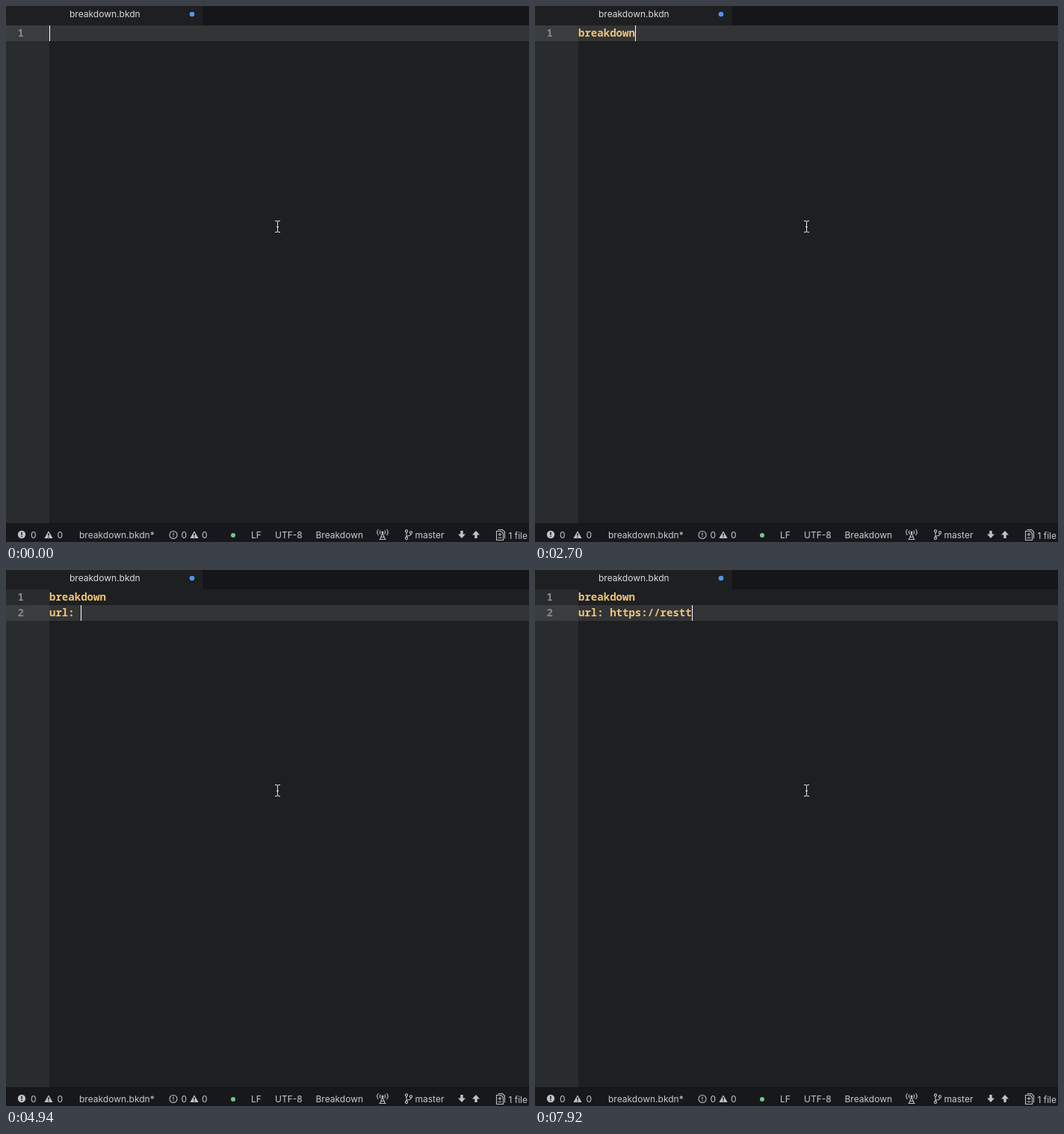
An HTML page for the animation above (8000 ms loop, 700 by 717 pixels).

```html
<!DOCTYPE html>
<html lang="en">
<head>
<meta charset="utf-8">
<style>
  html, body { margin: 0; width: 100%; height: 100%; overflow: hidden; background: #1d1f21; }
  svg { display: block; }
  text { white-space: pre; }
  .ui { font: 12px Inter, Roboto, sans-serif; fill: #c8cbcd; }
  .code { font: 600 14.05px "Noto Sans Mono", "DejaVu Sans Mono", monospace; }
  .num { fill: #85898b; }
  .icon { fill: none; stroke: #c0c3c5; stroke-width: 1.1; }
  .solid { fill: #c0c3c5; }
  .cut { fill: none; stroke: #17181b; stroke-width: 1.5; }
</style>
</head>
<body>
<svg width="700" height="717" viewBox="0 0 700 717">
  <defs>
    <g id="warn">
      <path class="solid" d="M0-5.3 5.6 4.6H-5.6Z"/>
      <path class="cut" d="M0-2.2V1.3M0 2.2V3.6"/>
    </g>
    <path id="arrow" class="solid" d="M-1.7-5H1.7V-.5H5L0 5-5-.5H-1.7Z"/>
  </defs>

  <rect width="700" height="26" fill="#151619"/>
  <rect width="264" height="26" fill="#1d1f21"/>
  <rect x="264" width="1" height="26" fill="#101113"/>
  <text class="ui" x="85" y="15" style="fill:#d9dcdd">breakdown.bkdn</text>
  <circle cx="249" cy="11" r="3.3" fill="#4f96f0"/>

  <rect y="26" width="58" height="666" fill="#282c2e"/>
  <g id="active">
    <rect y="26" width="58" height="21" fill="#393d3f"/>
    <rect x="58" y="26" width="642" height="21" fill="#333436"/>
  </g>
  <g class="code">
    <text class="num" x="15.5" y="41">1</text>
    <text class="num" x="15.5" y="62" id="second">2</text>
    <text class="line" x="58" y="41"></text>
    <text class="line" x="58" y="62"></text>
  </g>
  <rect id="caret" width="1" height="21" fill="#fff"/>

  <path d="M360 287.5H362Q363.5 287.5 363.5 289V301Q363.5 302.5 362 302.5H360M367 287.5H365Q363.5 287.5 363.5 289M363.5 301Q363.5 302.5 365 302.5H367M362 295.5H365" fill="none" stroke="#e4e4e4"/>

  <rect y="692" width="700" height="25" fill="#17181b"/>
  <rect y="692" width="700" height="1" fill="#101113"/>
  <g class="ui">
    <text x="33" y="712">0</text>
    <text x="68.500" y="712">0</text>
    <text x="98" y="712">breakdown.bkdn*</text>
    <text x="234.500" y="712">0</text>
    <text x="262" y="712">0</text>
    <text x="328" y="712">LF</text>
    <text x="360" y="712">UTF-8</text>
    <text x="414.500" y="712">Breakdown</text>
    <text x="547.500" y="712">master</text>
    <text x="672.500" y="713">1 file</text>
  </g>
  <circle class="solid" cx="21" cy="707" r="5.2"/>
  <path class="cut" d="M21 703.800V707.800M21 708.800V710.300"/>
  <use href="#warn" x="57" y="707.500"/>
  <circle class="icon" cx="224" cy="707.500" r="5"/>
  <path class="icon" d="M224 704.500V708.300M224 709.300V710.600"/>
  <use href="#warn" x="252" y="707.500"/>
  <circle cx="304" cy="708" r="3" fill="#70c888"/>

  <g class="icon">
    <path d="M504 705 500.500 714M504 705 507.500 714M502 710.500H506M499.500 713.500H508.500"/>
    <circle class="solid" cx="504" cy="704" r="1"/>
    <path d="M501.300 701.500Q499.500 704 501.300 706.500M506.700 701.500Q508.500 704 506.700 706.500M498.500 700Q495 704 498.500 708M509.500 700Q513 704 509.500 708"/>
    <circle cx="536" cy="702.500" r="1.600"/>
    <circle cx="536" cy="712" r="1.600"/>
    <circle cx="542" cy="704.500" r="1.600"/>
    <path d="M536 704V710.500M542 706Q542 708.500 538.500 708.800 536 709 536 710.500"/>
    <path d="M658.500 700.500H664.500L667.500 703.500V712.500M656.500 702.500H662.500L665.500 705.500V714.500H656.500ZM661 704.500V709.500M658.500 707H663.500M658.500 711.500H663.500"/>
  </g>
  <use href="#arrow" x="610" y="707"/>
  <use href="#arrow" transform="translate(629 707) scale(1 -1)"/>
</svg>
<script>
const LOOP = 8000, ADVANCE = 8.43, LINE = 21;
const typed = 'breakdown\nurl: https://restt';
// One key time per typed character
const keys = [
  150, 600, 750, 1050, 1350, 1650, 1800, 1950, 2100, 2850,
  3740, 3890, 4040, 4340, 4940, 5090, 5240, 5390, 5540, 5690,
  6130, 6430, 6580, 7330, 7480, 7630, 7770, 7920
];
const caretOff = [[450, 600], [2400, 2700], [3150, 3450], [4640, 4940], [5990, 6130], [6880, 7330]];
const keywords = [/^breakdown/, /^url:/];

const byId = id => document.getElementById(id);
const lineEls = document.querySelectorAll('.line');
const show = (el, on) => el.setAttribute('visibility', on ? 'visible' : 'hidden');

function draw(t) {
  const count = keys.filter(k => k <= t).length;
  const lines = typed.slice(0, count).split('\n');
  const row = lines.length - 1;
  lineEls.forEach((el, i) => {
    const text = lines[i] || '';
    el.textContent = text;
    el.setAttribute('fill', keywords[i].test(text) ? '#edc47a' : '#7a7d7f');
  });
  show(byId('second'), row > 0);
  byId('active').setAttribute('transform', `translate(0 ${row * LINE})`);
  const caret = byId('caret');
  caret.setAttribute('x', Math.round(58 + lines[row].length * ADVANCE));
  caret.setAttribute('y', 26 + row * LINE);
  show(caret, !caretOff.some(([from, to]) => t >= from && t < to));
}

const start = performance.now();
function tick() {
  draw((performance.now() - start) % LOOP);
  requestAnimationFrame(tick);
}
tick();
</script>
</body>
</html>
```
